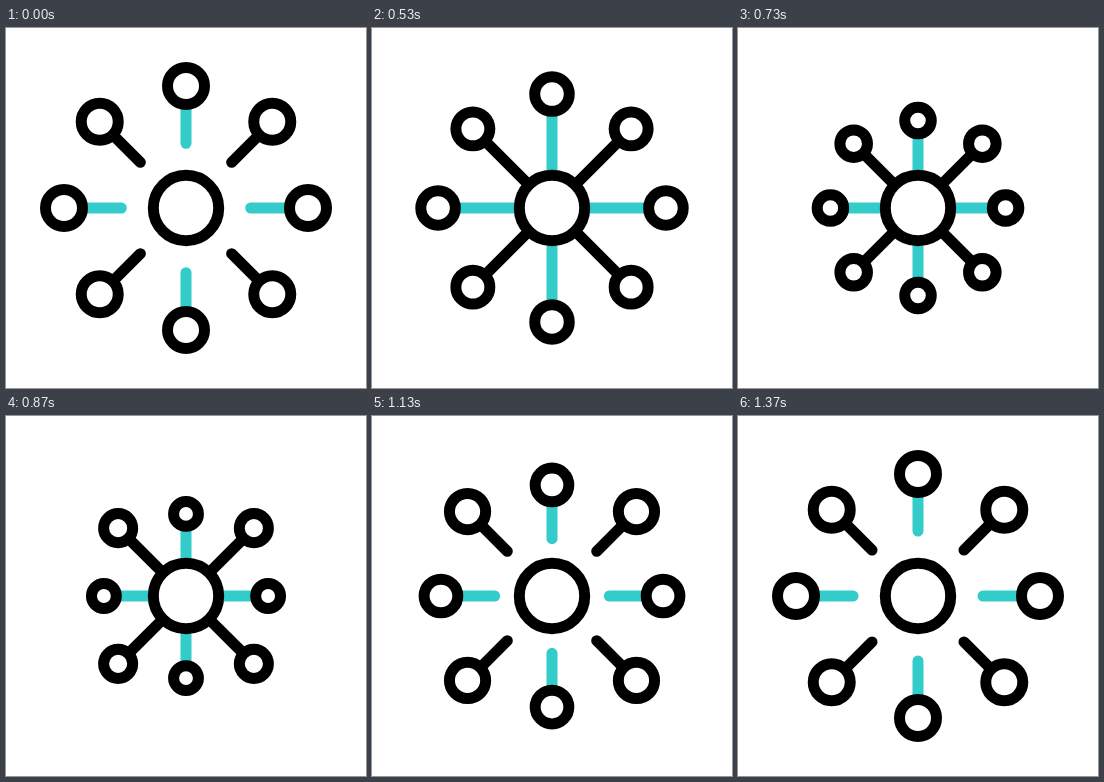
These frames come from a looping animation (360x360 px, 1670 ms). An HTML page with a canvas:

```html
<!DOCTYPE html>
<html lang="en">
<head>
<meta charset="utf-8">
<title>Hub and nodes</title>
<style>
  html, body { margin: 0; width: 100%; height: 100%; overflow: hidden; background: #fff; }
  canvas { display: block; width: 360px; height: 360px; }
</style>
</head>
<body>
<canvas id="stage" width="360" height="360"></canvas>
<script>
const ctx = document.getElementById('stage').getContext('2d');
const LOOP = 1670, LAST_STEP = 41;
const BLACK = '#000', TEAL = '#33cccb';
const FAR = 122;

// Times are in steps of 1/30 s.
const straight = {
  color: TEAL, near: 81, extend: [-1, 14.5],
  pull: [12.3, 25.3], push: [24.8, 41], retract: [24, 31]
};
const diagonal = {
  color: BLACK, near: 90, extend: [-1, 12],
  pull: [11.7, 23.2], push: [22.9, 37.5], retract: [22, 30]
};

const portion = (step, [from, to]) => Math.min(1, Math.max(0, (step - from) / (to - from)));
const smooth = x => x * x * (3 - 2 * x);

// Cubic bezier (.25, 0, .5, 1), solved by bisection.
function settle(x) {
  let lo = 0, hi = 1;
  for (let i = 0; i < 20; i++) {
    const p = (lo + hi) / 2, q = 1 - p;
    if (0.75 * p * q * q + 1.5 * p * p * q + p * p * p < x) lo = p; else hi = p;
  }
  return smooth(lo);
}

function ring(x, y, radius) {
  ctx.beginPath();
  ctx.arc(x, y, radius, 0, 2 * Math.PI);
  ctx.fillStyle = '#fff';
  ctx.fill();
  ctx.strokeStyle = BLACK;
  ctx.stroke();
}

function spoke(arm, angle, step) {
  const inward = step < arm.push[0]
    ? smooth(portion(step, arm.pull))
    : 1 - settle(portion(step, arm.push));
  const shift = (FAR - arm.near) * inward;
  const reach = smooth(portion(step, arm.extend)) * (1 - smooth(portion(step, arm.retract)));
  const distance = FAR - shift;
  const tip = Math.max(30, 65 - 0.7 * shift - 27 * reach);

  ctx.save();
  ctx.rotate(angle);
  ctx.beginPath();
  ctx.moveTo(tip, 0);
  ctx.lineTo(distance - 15, 0);
  ctx.strokeStyle = arm.color;
  ctx.stroke();
  ring(distance, 0, 18.5 - 0.152 * shift);
  ctx.restore();
}

function draw(ms) {
  const step = Math.min(LAST_STEP, Math.floor((ms + 4) * 0.03));
  ctx.setTransform(1, 0, 0, 1, 0, 0);
  ctx.fillStyle = '#fff';
  ctx.fillRect(0, 0, 360, 360);
  ctx.translate(180, 180);
  ctx.lineWidth = 11;
  ctx.lineCap = 'round';
  for (let i = 0; i < 8; i++) spoke(i % 2 ? diagonal : straight, i * Math.PI / 4, step);
  ring(0, 0, 32.7);
}

const start = performance.now();
function tick() {
  draw((performance.now() - start) % LOOP);
  requestAnimationFrame(tick);
}
tick();
</script>
</body>
</html>
```
